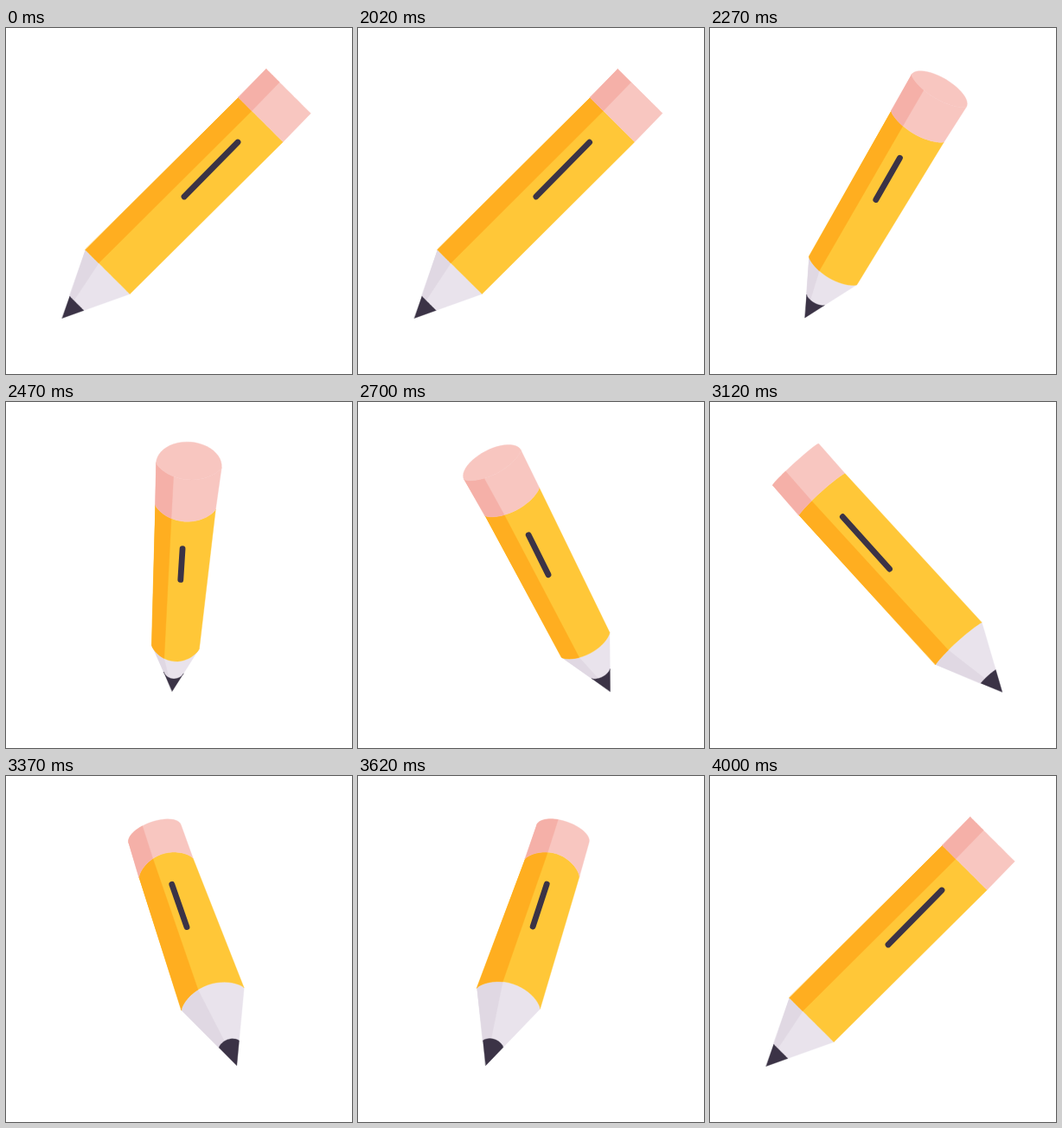
An HTML page with a canvas that plays this animation: 400 px wide and 400 px high, repeating every 4020 ms.

```html
<!DOCTYPE html>
<html lang="en">
<head>
<meta charset="utf-8">
<title>Pencil</title>
<style>
  html, body { margin: 0; height: 100%; overflow: hidden; background: #fff; }
  canvas { display: block; width: 100vmin; height: 100vmin; }
</style>
</head>
<body>
<canvas id="stage" width="400" height="400"></canvas>
<script>
const ctx = document.getElementById('stage').getContext('2d');
const LOOP = 4020, REST = 2020, START = 2000, TURN = 2000;
const MID_X = 205.5;
const DARK = '#3b3346';

// Each track holds [base, even, odd]: base + s² (even + odd·s), s being the lean towards the viewer.
const track = {
  tip:   { x: [-140.5, -12.6, 5.6],   y: [335.5, -1, 0] },
  wood:  { x: [-88, -6.2, -10.6],     y: [282, -14.4, 15.5], h: [36.3, -2.9, -5.9] },
  band:  { x: [89, -55.2, -12.5],     y: [106, 7.5, 8],      h: [36.4, -2.7, 1.3] },
  top:   { x: [121, -49.6, -7.3],     y: [73, -3.6, 3.6],    h: [36.4, -1.9, 3.5] },
  lineA: { x: [62.5, -55, -24],       y: [132, 14.1, 24] },
  lineB: { x: [0.5, -25.7, -15.8],    y: [195, -7.5, 18.1] }
};

function draw(angle) {
  const c = Math.cos(angle), s = Math.sin(angle), ss = s * s;
  const at = ([base, even, odd]) => base + ss * (even + odd * s);
  const place = ({ x, y, h }) => ({ x: MID_X + c * at(x), y: at(y), h: h ? at(h) : 0 });

  const tip = place(track.tip), wood = place(track.wood);
  const band = place(track.band), top = place(track.top);
  const bulge = s > 0 ? 17 * ss : -19.5 * ss;
  wood.m = bulge * (s > 0 ? 1 : 1.05);
  band.m = bulge;
  top.m = bulge * (s > 0 ? 1 : 0.88);

  const k = 0.32 + (s > 0 ? 0.1 * ss : 0);
  const lead = {
    x: tip.x + (wood.x - tip.x) * k,
    y: tip.y + (wood.y - tip.y) * k,
    h: wood.h * k,
    m: wood.m * k
  };
  const point = { x: tip.x, y: tip.y, h: 0, m: 0 };

  const tilt = Math.atan2(top.x - tip.x, tip.y - top.y);
  const ux = Math.cos(tilt), uy = Math.sin(tilt);
  const ridge = -0.4 + ss * (s > 0 ? -0.04 : 0.09);

  // Points along a ring's rim, from a0 to a1 in units of its half width.
  // Power 1 gives half an ellipse, higher powers a shallower arc.
  function rim(ring, a0, a1, m = ring.m, power = ring === top && s < 0 ? 1 : 1.5) {
    const b0 = Math.acos(a0), b1 = Math.acos(a1), pts = [];
    for (let i = 0; i <= 24; i++) {
      const b = b0 + (b1 - b0) * i / 24;
      const p = ring.h * Math.cos(b), q = m * Math.max(Math.sin(b), 0) ** power;
      pts.push([ring.x + ux * p - uy * q, ring.y + uy * p + ux * q]);
    }
    return pts;
  }

  function fill(pts, color) {
    ctx.beginPath();
    pts.forEach(p => ctx.lineTo(...p));
    ctx.closePath();
    ctx.fillStyle = ctx.strokeStyle = color;
    ctx.lineWidth = 0.4;
    ctx.fill();
    ctx.stroke();
  }

  function section(upper, lower, light, shade) {
    const strip = (end, color) =>
      fill([...rim(upper, -1, end), ...rim(lower, end, -1)], color);
    strip(1, light);
    if (shade) strip(ridge, shade);
  }

  ctx.fillStyle = '#fff';
  ctx.fillRect(0, 0, 400, 400);
  ctx.lineJoin = 'round';
  section(wood, lead, '#e9e3ec', '#e0d8e3');
  section(lead, point, DARK);
  section(band, wood, '#ffc738', '#ffae20');
  section(top, band, '#f8c6c0', '#f5b0a8');
  if (s > 0) fill([...rim(top, -1, 1, -27 * ss, 1), ...rim(top, 1, -1)], '#f8c6c0');

  const a = place(track.lineA), b = place(track.lineB);
  ctx.beginPath();
  ctx.moveTo(a.x, a.y);
  ctx.lineTo(b.x, b.y);
  ctx.strokeStyle = DARK;
  ctx.lineWidth = 6.8;
  ctx.lineCap = 'round';
  ctx.stroke();
}

const begin = performance.now();
function frame() {
  const t = (performance.now() - begin) % LOOP;
  const turn = t < REST ? 0 : Math.min((t - START) / TURN, 1);
  draw(turn * 2 * Math.PI);
  requestAnimationFrame(frame);
}
frame();
</script>
</body>
</html>
```
